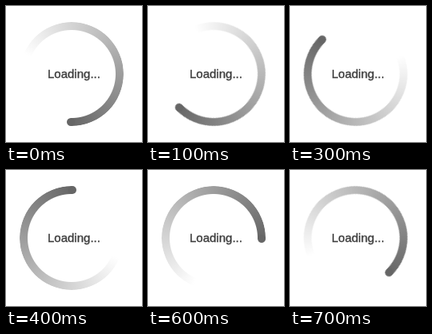
Animation of 170x170 px, one loop 800 ms. Source, as an HTML page:

```html
<!DOCTYPE html>
<html lang="en">
<head>
<meta charset="utf-8">
<title>Loading</title>
<style>
  html, body {
    margin: 0;
    width: 100%;
    height: 100%;
    overflow: hidden;
    background: #fff;
  }
  .spinner {
    position: absolute;
    left: 17px;
    top: 20px;
    width: 130px;
    height: 130px;
    animation: spin 800ms steps(8) infinite;
  }
  /* Tail fades in clockwise, the dark head ends at the top */
  .ring {
    position: absolute;
    inset: 0;
    border-radius: 50%;
    background: conic-gradient(from 1deg, #fff 112deg, #d2d2d2 182deg, #9c9c9c 270deg, #666 360deg);
    -webkit-mask: radial-gradient(circle, transparent 54.5px, #000 55.5px);
    mask: radial-gradient(circle, transparent 54.5px, #000 55.5px);
  }
  .cap {
    position: absolute;
    left: 61px;
    top: 0;
    width: 10px;
    height: 10px;
    border-radius: 50%;
    background: #666;
  }
  .label {
    position: absolute;
    left: 52px;
    top: 75px;
    font: 15px/20px "Liberation Sans", Arial, sans-serif;
    color: #3c3c3c;
    -webkit-text-stroke: 0.35px #3c3c3c;
    white-space: nowrap;
  }
  @keyframes spin {
    from { transform: rotate(180deg); }
    to { transform: rotate(540deg); }
  }
</style>
</head>
<body>
  <div class="spinner">
    <div class="ring"></div>
    <div class="cap"></div>
  </div>
  <div class="label">Loading...</div>
</body>
</html>
```
